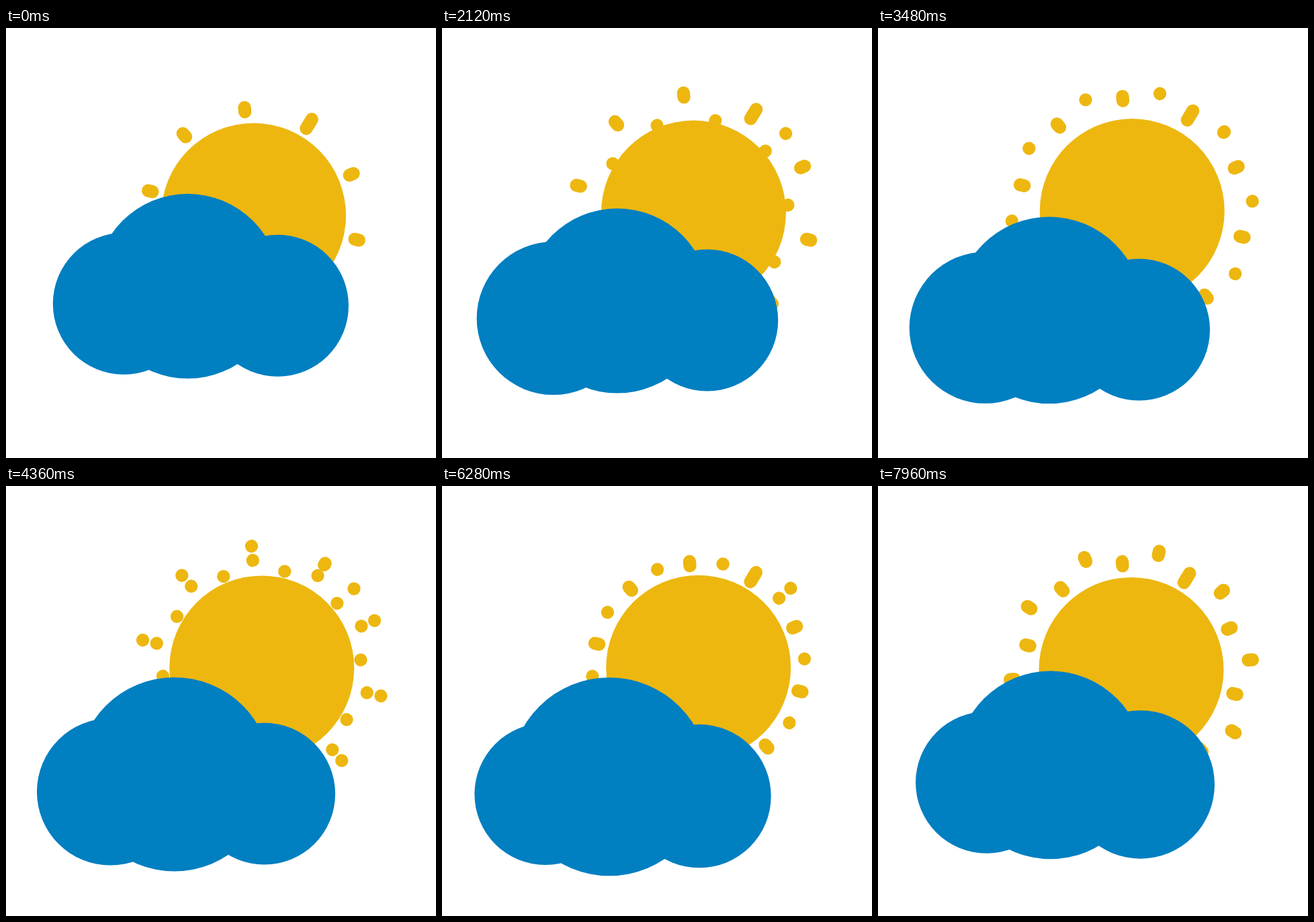
These frames come from a looping animation (640x640 px, 8000 ms). An HTML page with a canvas:

```html
<!DOCTYPE html>
<html lang="en">
<head>
<meta charset="utf-8">
<title>Sun and cloud</title>
<style>
  html, body { margin: 0; width: 100%; height: 100%; overflow: hidden; background: #fff; }
  canvas { display: block; width: 100vmin; height: 100vmin; }
</style>
</head>
<body>
<canvas id="stage" width="640" height="640"></canvas>
<script>
const ctx = document.getElementById('stage').getContext('2d');
const LOOP = 8000;
const YELLOW = '#edb710';
const BLUE = '#007fc1';
const RAY_END = 182;
const RAY_MID = 162.6;
const TURN = 5490;

// The picture advances in uneven steps, five per 560 ms.
const STEPS = [0, 140, 240, 320, 440];
function stepTime(t) {
  const base = 120 + Math.floor((t - 120) / 560) * 560;
  return base + STEPS.filter(s => s <= t - base).pop();
}

// Piecewise linear value through [time, value] points.
function track(t, points) {
  if (t <= points[0][0]) return points[0][1];
  for (let i = 1; i < points.length; i++) {
    const [t0, v0] = points[i - 1];
    const [t1, v1] = points[i];
    if (t <= t1) return v0 + (v1 - v0) * (t - t0) / (t1 - t0);
  }
  return points[points.length - 1][1];
}

const LEFT_R = [[600, 105.5], [2533, 116.3], [5430, 105.5]];
const MID_R = [[3230, 137.5], [5500, 151.2], [8505, 137.5]];
const RIGHT_R = [[5720, 105.5], [8080, 110.6]];
const DOT_R = [[0, 127], [1120, 182], [2240, 136], [3520, 181], [4480, 143],
               [5600, 182], [6720, 143], [7840, 182], [8960, 143]];

function disc(x, y, r, color) {
  ctx.fillStyle = color;
  ctx.beginPath();
  ctx.arc(x, y, r, 0, Math.PI * 2);
  ctx.fill();
}

// Round-ended dash on a ray, between two distances from the sun's centre.
function dash(sun, deg, from, to) {
  const a = deg * Math.PI / 180;
  const c = Math.cos(a), s = Math.sin(a);
  ctx.beginPath();
  ctx.moveTo(sun.x + c * from, sun.y + s * from);
  ctx.lineTo(sun.x + c * (to + 0.01), sun.y + s * (to + 0.01));
  ctx.stroke();
}

function dashRays(t, sun) {
  const turns = (t - 1240) / 1590;
  const phase = turns - Math.floor(turns);
  const centre = 146 + 54 * phase;
  for (let i = 0; i < 10; i++) {
    const deg = -166.8 + 36 * i;
    const long = i === 3;
    const half = long ? 8 : 3.2;
    const mid = long ? RAY_MID + 0.7 * (centre - RAY_MID) : centre;
    dash(sun, deg, Math.min(mid - half, RAY_END), Math.min(mid + half, RAY_END));

    // Trailing dots: one rests at the tip, one slips back inward.
    const fresh = phase < 0.05;
    if (fresh) dash(sun, deg, RAY_END, RAY_END);
    if (fresh || phase > 0.72) {
      const back = fresh ? 1 : (phase - 0.6) / 0.4;
      const r = RAY_END - 23.5 * back;
      dash(sun, deg, r, r);
    }
  }
}

function dotRays(t, sun) {
  const r = track(t, DOT_R);
  const half = t > 6720 ? 3.2 : 0;
  for (let i = 0; i < 10; i++) dash(sun, -148.7 + 36 * i, r - half, r + half);
  if (t >= 1120) dash(sun, -40.7, 181, 181);
}

function draw(t) {
  const k = 1 - Math.abs(t - TURN) / TURN;
  const sun = { x: 368.5 + 15.4 * k, y: 279 - 10.2 * k };
  const cloud = { x: 270.5 - 25 * k, y: 384.3 + 56.4 * k };

  ctx.fillStyle = '#fff';
  ctx.fillRect(0, 0, 640, 640);

  ctx.strokeStyle = YELLOW;
  ctx.lineWidth = 19.3;
  ctx.lineCap = 'round';
  dashRays(t, sun);
  dotRays(t, sun);
  disc(sun.x, sun.y, 137.5, YELLOW);

  disc(cloud.x - 95.2, cloud.y + 26, track(t, LEFT_R), BLUE);
  disc(cloud.x, cloud.y, track(t, MID_R), BLUE);
  disc(cloud.x + 133.9, cloud.y + 29, track(t, RIGHT_R), BLUE);
}

const start = performance.now();
function tick() {
  draw(stepTime((performance.now() - start) % LOOP));
  requestAnimationFrame(tick);
}
tick();
</script>
</body>
</html>
```
